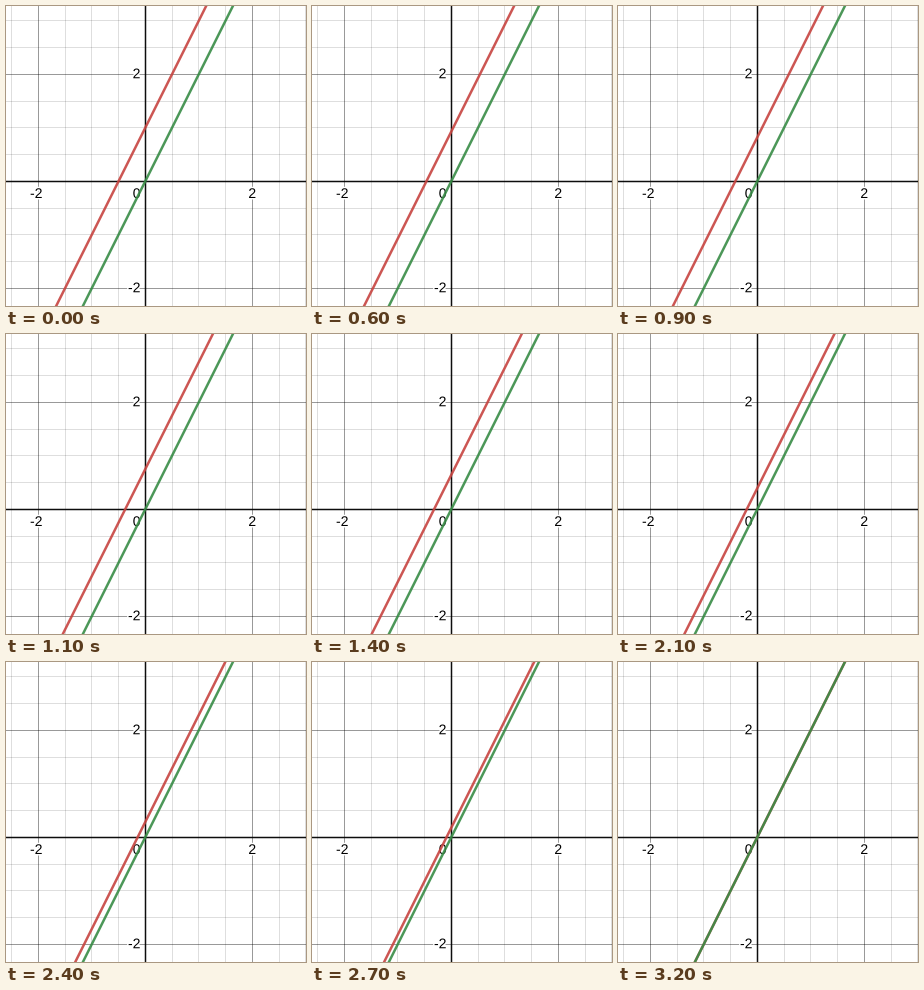
These frames come from a looping animation (300x300 px, 4 s). A matplotlib script:

```python
import numpy as np
import matplotlib.pyplot as plt
from matplotlib.animation import FuncAnimation
from matplotlib.patheffects import withStroke

SIZE, DPI = 300, 100
PX = 72 / DPI                    # points per pixel
X0, Y0, UNIT = 139.27, 175.27, 53.5
STEP_MS, FRAMES = 100, 40
START, STEPS = 4, 28             # last still frame, number of slide steps
SLOPE = 2

fig = plt.figure(figsize=(SIZE / DPI, SIZE / DPI), dpi=DPI, facecolor="white")
ax = fig.add_axes([0, 0, 1, 1])
ax.set_xlim(0, SIZE)
ax.set_ylim(SIZE, 0)
ax.axis("off")


def sx(x):
    return X0 + UNIT * x


def sy(y):
    return Y0 - UNIT * y


def crisp(p):
    return np.floor(p) + 0.5


def grid(values, alpha, width, z):
    style = dict(color="black", alpha=alpha, lw=width * PX, zorder=z, snap=False)
    for v in values:
        ax.plot([crisp(sx(v))] * 2, [-5, SIZE + 5], **style)
        ax.plot([-5, SIZE + 5], [crisp(sy(v))] * 2, **style)


def label(x, y, text, ha):
    ax.text(x, y, text, ha=ha, va="baseline", fontsize=14 * PX,
            family="Liberation Sans", color="black", zorder=4,
            path_effects=[withStroke(linewidth=3 * PX, foreground="white")])


def graph(color, z):
    return ax.plot([], [], color=color, alpha=0.9, lw=2.5 * PX, zorder=z)[0]


def place(line, b):
    x = np.array([-4.0, 4.0])
    line.set_data(sx(x), sy(SLOPE * x + b))


minor = [v for v in np.arange(-3, 3.5, 0.5) if v % 2]
grid(minor, 0.13, 1, 1)
grid([-2, 2], 0.4, 1, 2)
grid([0], 0.95, 1.5, 3)

label(sx(-2) - 2, 192, "-2", "center")
label(sx(2), 192, "2", "center")
label(134.5, 192, "0", "right")
label(134.5, sy(2) + 4, "2", "right")
label(134.5, sy(-2) + 4, "-2", "right")

red = graph("#c74440", 5)
green = graph("#388c46", 6)
place(green, 0)


def update(i):
    place(red, 1 - np.clip((i - START) / STEPS, 0, 1))
    return red,


anim = FuncAnimation(fig, update, frames=FRAMES, interval=STEP_MS,
                     repeat=True, repeat_delay=0, blit=False)
plt.show()
```
